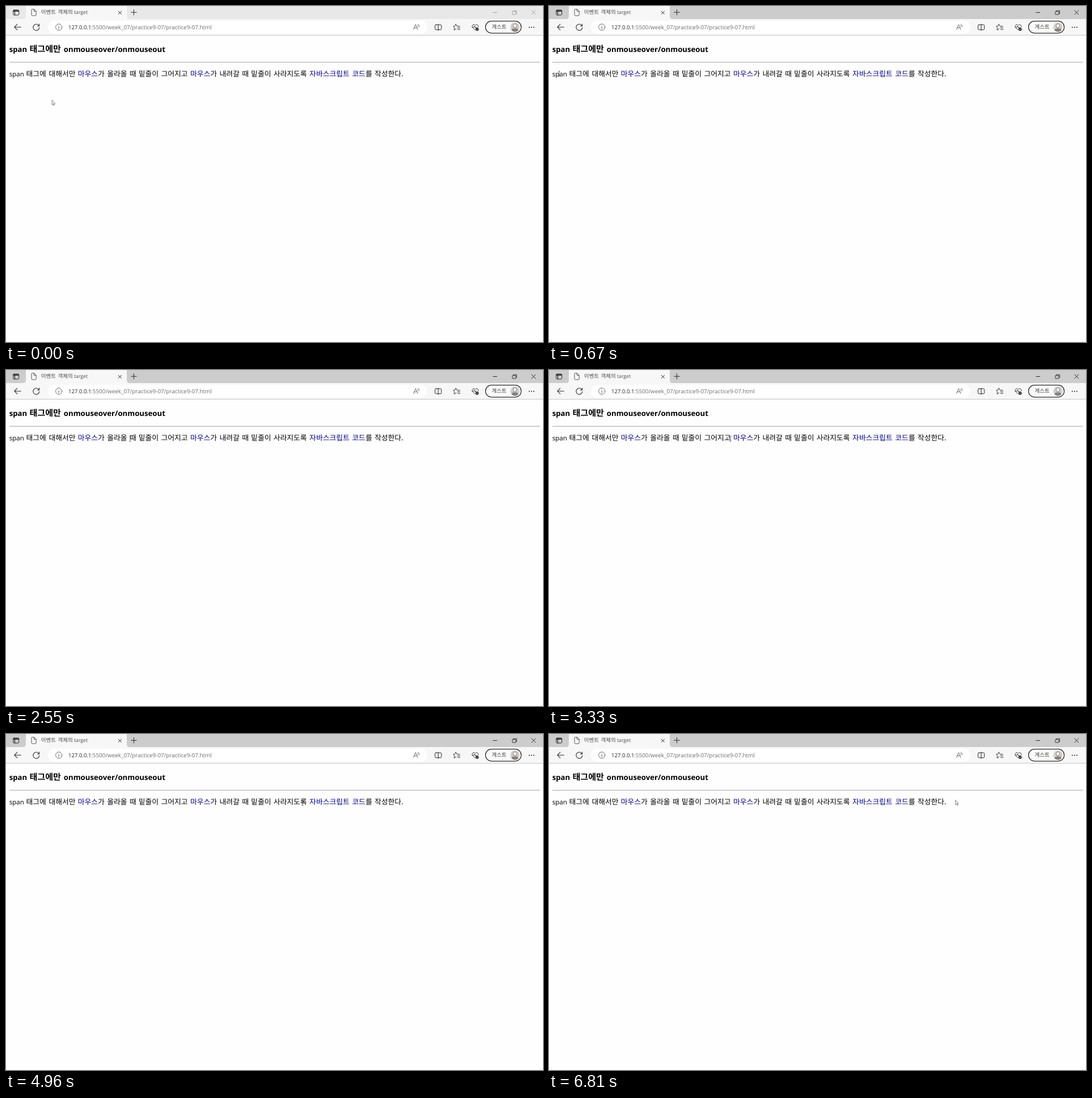
Animation, 947 px wide and 592 px high, one loop 7.78 s. Source, as an HTML page:

```html
<!DOCTYPE html>
<html lang="ko">
<head>
<meta charset="utf-8">
<title>이벤트 객체의 target</title>
<style>
  html, body { margin: 0; width: 100%; height: 100%; overflow: hidden; background: #fefefe; }
  svg { display: block; position: absolute; left: 0; top: 0; }
  text { text-rendering: geometricPrecision; }
  .ko { font-family: "Noto Sans CJK KR", "Noto Sans CJK", sans-serif; }
  .en { font-family: "Open Sans", "Noto Sans", sans-serif; }
  .line { fill: none; stroke: #2b2b2b; stroke-width: 1; stroke-linecap: round; stroke-linejoin: round; }
  .head { font-weight: 700; }
  .link { fill: #000086; }
  .body { font-size: 12.82px; }

  .bar, .controls, .cursor, .arrow, .beam, .under {
    animation: 7780ms step-end infinite;
  }
  .bar { animation-name: bar; }
  .controls { animation-name: controls; stroke-linecap: butt; }
  .cursor { animation-name: move; }
  .arrow { animation-name: arrow; }
  .beam { animation-name: beam; }
  .under { fill: #000086; opacity: 0; }
  .u1 { animation-name: u1; }
  .u2 { animation-name: u2; }
  .u3 { animation-name: u3; }

  @keyframes bar { 0% { fill: #e8e8e8; } .89%, 100% { fill: #ccc; } }
  @keyframes controls { 0% { stroke: #a2a2a2; } .89%, 100% { stroke: #2b2b2b; } }

  /* hotspot of the pointer, moved in small discrete jumps */
  @keyframes move {
    0%     { transform: translate(80.7px, 165.5px); }
    5.14%  { transform: translate(76px, 162px); animation-timing-function: steps(4); }
    8.61%  { transform: translate(18px, 119.3px); }
    12.08% { transform: translate(19px, 119.6px); animation-timing-function: steps(10); }
    21.20% { transform: translate(122px, 122px); }
    22.10% { transform: translate(127px, 122px); animation-timing-function: steps(2); }
    23.77% { transform: translate(136px, 122px); animation-timing-function: steps(9); }
    32.00% { transform: translate(210px, 121.5px); }
    32.77% { transform: translate(219px, 121.2px); animation-timing-function: steps(10); }
    41.77% { transform: translate(310px, 121.2px); }
    42.80% { transform: translate(320px, 121.2px); animation-timing-function: steps(11); }
    52.18% { transform: translate(413px, 121.8px); }
    52.95% { transform: translate(420px, 121.8px); }
    53.85% { transform: translate(426px, 121.8px); animation-timing-function: steps(10); }
    62.59% { transform: translate(512.5px, 121.5px); }
    63.75% { transform: translate(523px, 121.5px); animation-timing-function: steps(10); }
    72.10% { transform: translate(600px, 121.2px); }
    73.00% { transform: translate(609px, 121.2px); }
    73.90% { transform: translate(617px, 121px); animation-timing-function: steps(11); }
    83.67% { transform: translate(709px, 118px); }
    84.57% { transform: translate(713px, 117.2px); }
    85.34% { transform: translate(716px, 116.6px); }
    87.53%, 100% { transform: translate(716.4px, 116px); }
  }
  @keyframes arrow { 0% { opacity: 1; } 8.61% { opacity: 0; } 83.67%, 100% { opacity: 1; } }
  @keyframes beam { 0% { opacity: 0; } 8.61% { opacity: 1; } 83.67%, 100% { opacity: 0; } }
  @keyframes u1 { 0% { opacity: 0; } 22.10% { opacity: 1; } 27.42%, 100% { opacity: 0; } }
  @keyframes u2 { 0% { opacity: 0; } 43.65% { opacity: 1; } 47.06%, 100% { opacity: 0; } }
  @keyframes u3 { 0% { opacity: 0; } 65.42% { opacity: 1; } 76.56%, 100% { opacity: 0; } }
</style>
</head>
<body>
<svg width="947" height="592" viewBox="0 0 947 592">
  <!-- title bar -->
  <rect class="bar" width="947" height="23" fill="#e8e8e8"/>
  <path d="M30 23Q35 23 35 18V0H213V18Q213 23 218 23Z" fill="#f7f7f7"/>
  <g class="line">
    <rect x="12.7" y="7" width="10" height="9" rx="1.8"/>
    <path d="M13 8.1H22.5M13 9.1H22.5M15.4 9V15.8" stroke-width="1.3"/>
    <path d="M45 6.8Q45 5.6 46.2 5.6H49.6L53.2 9.2V15.8Q53.2 17 52 17H46.2Q45 17 45 15.8ZM49.4 5.8V9.4H53" stroke="#444" stroke-width=".9"/>
    <path d="M198.1 9.1L203.5 14.5M203.5 9.1L198.1 14.5"/>
    <path d="M220.6 11.2H230.2M225.4 6.4V16"/>
  </g>
  <text class="ko" x="61.8" y="14.4" font-size="9.5" fill="#4a4a4a">이벤트<tspan x="91.6">객체의</tspan></text>
  <text class="en" x="120" y="14.4" font-size="8.7" fill="#4a4a4a">target</text>
  <g class="line controls">
    <path d="M858.5 11.5H866"/>
    <path d="M893 9.8H899V15H893ZM894.6 9.6V8.2H900.6V13.4H899.2" stroke-width=".9"/>
    <path d="M926.7 7.7L934.1 15.1M934.1 7.7L926.7 15.1"/>
  </g>

  <!-- toolbar -->
  <rect y="23" width="947" height="28.4" fill="#f7f7f7"/>
  <rect y="51" width="947" height="1" fill="#c6c6c6"/>
  <rect x="74" y="26" width="668.5" height="22.6" rx="11.3" fill="#fff"/>
  <g class="line">
    <path d="M26.4 37.2H15M19.8 32.2L14.8 37.2L19.8 42.2" stroke-width="1.1"/>
    <path d="M58.2 35A5.5 5.5 0 1 0 58.8 37.8M58.6 31.8V35.2H55.2" stroke-width="1.1"/>
    <g stroke="#666" stroke-width=".95">
      <circle cx="93.2" cy="37.3" r="5.6"/>
      <path d="M93.2 36.6V40M93.2 34.5V34.6" stroke-width="1.1"/>
      <path d="M718.6 41.4L722.4 32.6L726.2 41.4M720 38.4H724.8"/>
      <path d="M725.8 33.2Q727 34.6 726.6 36.4M727.4 32Q729.4 34.2 728.8 37" stroke-width=".8"/>
    </g>
    <rect x="756.6" y="33" width="11.2" height="8.8" rx="1.6"/>
    <path d="M762.2 32V43"/>
    <path d="M797.4 35.7L795 35.4L793.3 31.8L791.6 35.4L788.8 35.9L790.8 38.4L790.2 42.4L793.6 40.4M797.4 35.8H800.6M796 38.6H800.6M796.6 41.4H800.6" stroke-width=".95"/>
    <path d="M827.2 42.2L822.6 37.8C820.4 34.8 824.6 30.6 827.4 34.2C830.2 30.6 834.2 34.4 832.6 37M822 37.3H825L826.2 35.4L828 38.6L829 37.2" stroke-width=".95"/>
    <circle cx="830.8" cy="40.8" r="2.9" fill="#2b2b2b" stroke="none"/>
    <path d="M829.6 40.8L830.5 41.7L832.1 40" stroke="#fff" stroke-width=".7"/>
    <rect x="845.6" y="26.6" width="63" height="21.2" rx="10.6" stroke-width="1.2" fill="#fafafa"/>
  </g>
  <text class="en" x="110" y="41" font-size="9.55" fill="#222">127.0.0.1</text>
  <text class="en" x="150.2" y="41" font-size="9.88" fill="#6c6c6c">:5500/week_07/practice9-07/practice9-07.html</text>
  <text class="ko" x="856.6" y="40.4" font-size="9.5" fill="#333">게스트</text>
  <circle cx="897.5" cy="37.4" r="8.3" fill="#d2cfcd"/>
  <circle cx="897.5" cy="34.8" r="3.4" fill="#f2f1f0" stroke="#85817e" stroke-width="1"/>
  <path d="M891.8 43.2Q892 39.6 895 39.6H900Q903 39.6 903.2 43.2Q897.5 48 891.8 43.2Z" fill="#85817e"/>
  <g fill="#2b2b2b">
    <circle cx="922.8" cy="37.4" r="1"/>
    <circle cx="926.8" cy="37.4" r="1"/>
    <circle cx="930.8" cy="37.4" r="1"/>
  </g>

  <!-- page -->
  <text class="en head" x="5.8" y="81" font-size="13.1">span</text>
  <text class="ko head" x="41.6" y="81.2" font-size="15">태그에만</text>
  <text class="en head" x="101.8" y="81" font-size="13.2">onmouseover/onmouseout</text>
  <rect x="6" y="98.6" width="935.5" height="1" fill="#a0a0a0"/>
  <text class="en" x="5.8" y="124" font-size="11.5">span</text>
  <text class="ko body" y="124.2">
    <tspan x="35.5">태그에</tspan>
    <tspan x="75.4">대해서만</tspan>
    <tspan x="126.7" class="link">마우스</tspan><tspan x="162.1">가</tspan>
    <tspan x="178.2">올라올</tspan>
    <tspan x="218">때</tspan>
    <tspan x="233.8">밑줄이</tspan>
    <tspan x="273.4">그어지고</tspan>
    <tspan x="324.9" class="link">마우스</tspan><tspan x="360.3">가</tspan>
    <tspan x="376.4">내려갈</tspan>
    <tspan x="416.2">때</tspan>
    <tspan x="432.1">밑줄이</tspan>
    <tspan x="471.7">사라지도록</tspan>
    <tspan x="535.1" class="link">자바스크립트</tspan>
    <tspan x="610.2" class="link">코드</tspan><tspan x="634">를</tspan>
    <tspan x="649.9">작성한다.</tspan>
  </text>
  <rect class="under u1" x="126.7" y="125.6" width="35.4" height="1"/>
  <rect class="under u2" x="324.9" y="125.6" width="35.4" height="1"/>
  <rect class="under u3" x="535.1" y="125.6" width="98.9" height="1"/>

  <g class="cursor">
    <path class="arrow" d="M.4 .4V8.6L2.2 7L3.5 9.8L4.7 9.2L3.5 6.5H5.7Z" fill="#fff" stroke="#444" stroke-width=".7" stroke-linejoin="round"/>
    <path class="beam" d="M-1.6 -4.4H1.6M0 -4.4V4.4M-1.6 4.4H1.6" fill="none" stroke="#444" stroke-width=".8"/>
  </g>
</svg>
</body>
</html>
```
